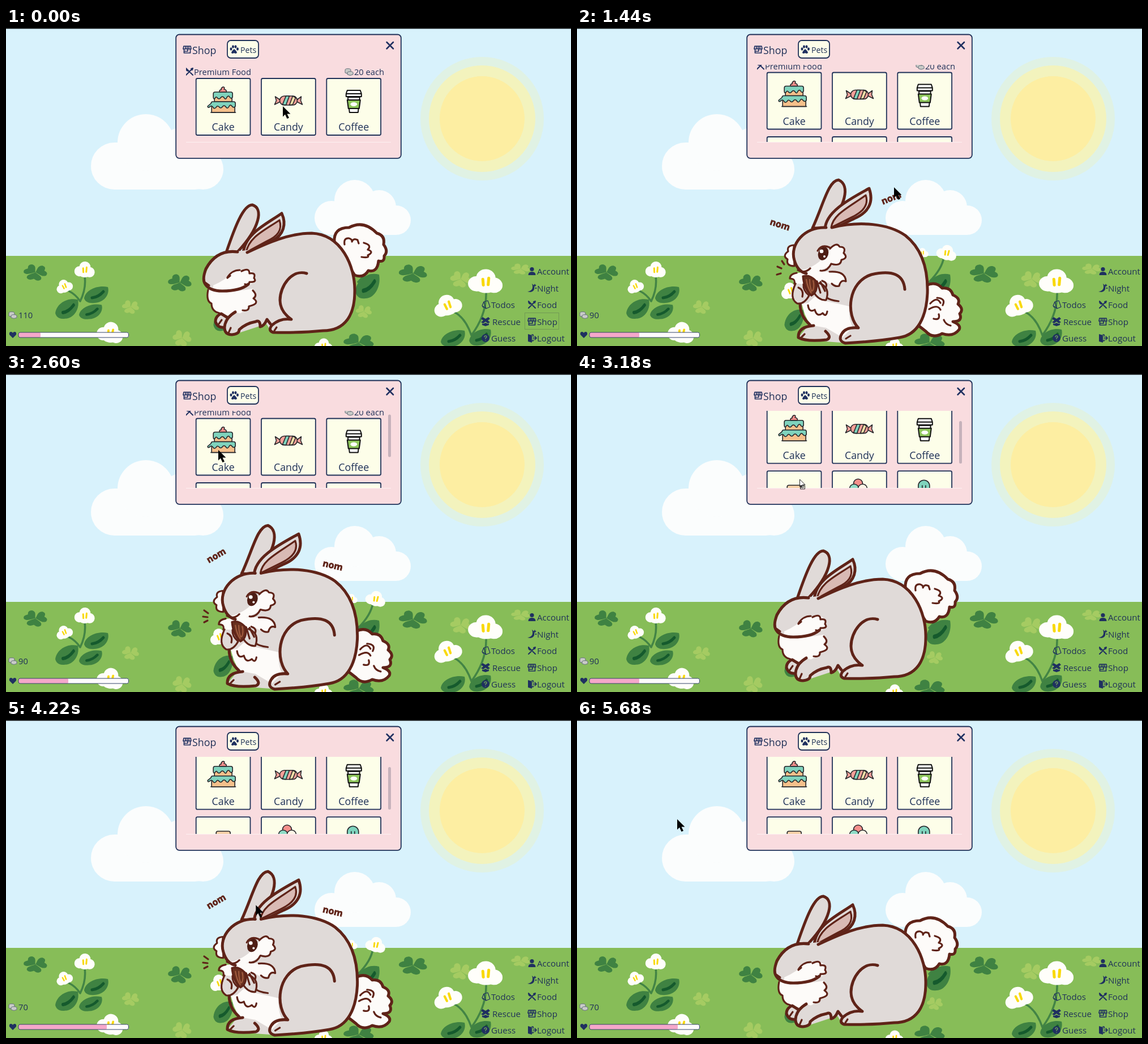
Recreate the animation shown at these times as an HTML page. Size 998 by 561 pixels, loop 5.72 s.

```html
<!DOCTYPE html>
<html lang="en">
<head>
<meta charset="utf-8">
<title>Bunny shop</title>
<style>
html,body{margin:0;height:100%;overflow:hidden;background:#d8f2fc}
svg{display:block;width:100vw;height:100vh}
text{font:14.7px "Open Sans","Noto Sans",sans-serif;fill:#1f3158}
.big{font-size:17.8px}
.mid{text-anchor:middle}
.nom{font:700 16px "Open Sans",sans-serif;fill:#5f2318;stroke:#5f2318;stroke-width:.7;text-anchor:middle}
.ink{stroke:#5f2318;stroke-width:5;stroke-linecap:round;stroke-linejoin:round}
.thin{stroke-width:3.2}
.fur{fill:#e0dad8}.white{fill:#fdfbf9}.pink{fill:#d9bab4}.none{fill:none}
.navy{fill:#1f3060}
.line{fill:none;stroke:#1f3060;stroke-width:1.7;stroke-linecap:round;stroke-linejoin:round}
.card{fill:#fdfee9;stroke:#1f3158;stroke-width:1.8}
.food{stroke:#26262b;stroke-width:1.6;stroke-linejoin:round}
.stem{fill:none;stroke:#438445;stroke-width:3.5;stroke-linecap:round}
</style>
</head>
<body>
<svg viewBox="0 0 998 561" preserveAspectRatio="none">
<defs>
  <path id="petal" d="M0 0C-4-4-12-6-10-13Q-6-18 0-13Q6-18 10-13C12-6 4-4 0 0Z"/>
  <g id="clover">
    <use href="#petal" transform="rotate(-55)"/><use href="#petal" transform="rotate(75)"/><use href="#petal" transform="rotate(190)"/>
  </g>
  <g id="flower">
    <g fill="#fffefa"><circle cx="-9" cy="3" r="9"/><circle cx="9" cy="3" r="9"/><circle cy="-5" r="10"/><ellipse cy="6" rx="11" ry="7"/></g>
    <path d="M-3-3l1 7M3-5l0 8" fill="none" stroke="#f9d90c" stroke-width="3" stroke-linecap="round"/>
  </g>
  <g id="leaf">
    <path fill="#3f8242" d="M-22 6C-20-8 0-18 20-14C24 0 12 14-4 14C-14 15-20 12-22 6Z"/>
    <path d="M-8 5Q3 4 12-6" fill="none" stroke="#155a2d" stroke-width="5" stroke-linecap="round"/>
  </g>
  <g id="user" class="navy"><circle cy="-3.5" r="3.6"/><path d="M-6.500 7Q-6.500 1 0 1T6.500 7Z"/></g>
  <g id="moon" class="navy"><path d="M0-8C8-3 5 10-8 6C0 5 3 0 0-8Z"/><path d="M5-8l1 2 2 1-2 1-1 2-1-2-2-1 2-1Z"/><circle cx="7" cy="0" r="1.200"/></g>
  <path id="note" class="line" style="stroke-width:1.200" d="M-4-5L3-7L7 4L0 7ZM-4-5L-7 2L0 7M-7 2l2 3"/>
  <path id="utensils" class="line" style="stroke-width:2" d="M-6-6L6 6M6-6L-6 6M-6-6q0 5 5 5M6-6l-3 1M6-6l-1 3"/>
  <g id="box" class="navy"><path d="M-5-8L0-5L5-8L8-5L4-2L8 1L4 3L0 0L-4 3L-8 1L-4-2L-8-5Z"/><path d="M-6 3L-4 4L0 2L4 4L6 3V6L0 8L-6 6Z"/></g>
  <path id="store" class="line" d="M-6-6H6L7-1H-7ZM-3-6V-1M0-6V-1M3-6V-1M-5.500-1V6H5.500V-1M-5 3H1V-1"/>
  <g id="help"><circle r="7" class="navy"/><path d="M-2-2q0-2 2-2t2 2q0 1-2 2v1M0 4v0" fill="none" stroke="#6b9a5c" stroke-width="1.500" stroke-linecap="round"/></g>
  <g id="exit"><path class="navy" d="M-7-7L0-5V8L-7 6Z"/><path class="line" d="M0-6H2V-3M0 5H2V3M2 0H7M5-3L8 0L5 3"/></g>
  <g id="coins" fill="#c9cbc8" stroke="#65707a"><ellipse cx="-2" cy="-3" rx="5" ry="2.300"/><path d="M-7-2v4q5 3 10 0v-4"/><ellipse cx="2" cy="2" rx="5" ry="2.300"/><path d="M-3 2v3q5 3 10 0v-3"/></g>
  <g id="paw" class="navy"><ellipse cx="-5.500" cy="-1" rx="2" ry="2.700"/><ellipse cx="-2" cy="-5" rx="2" ry="2.700"/><ellipse cx="2.500" cy="-5" rx="2" ry="2.700"/><ellipse cx="6" cy="-1" rx="2" ry="2.700"/><path d="M0-1Q5 3 5 6Q2 8 0 6Q-3 8-5 6Q-5 3 0-1Z"/></g>
  <path id="heart" class="navy" d="M0 6L-6 0Q-7-5-3-5Q-1-5 0-3Q1-5 3-5Q7-5 6 0Z"/>
  <g id="cake" class="food">
    <path fill="#f5c08b" d="M-15-12H16V2H-15ZM-20 5H21V21H-20Z"/>
    <path fill="#7fd3bd" d="M-17-12q0-3 3-3H14q3 0 3 3V-6q-3 4-5 0q-2-4-5 0q-2 6-5 1q-3-4-6 0q-3 4-6 0q-2-3-4 1q-3 2-3-2ZM-21 5q0-3 3-3H19q3 0 3 3V10q-3 4-6 0q-3-4-5 0q-3 6-6 1q-3-4-6 0q-3 4-6 0q-3-3-5 1q-4 4-6-1q-3-3-5 0q-4 3-4-1Z"/>
    <path fill="#f5908c" d="M-6-15q-1-4 3-4q-1-3 3-5q4 0 2 4q5 1 4 5Z"/><path d="M-22 21H23"/>
  </g>
  <g id="candy" class="food">
    <path fill="#f5a099" d="M-14-1L-23-7L-21 0L-24 7L-14 2ZM15-1L23-7L22 0L25 7L15 2Z"/>
    <rect x="-15" y="-8" width="31" height="16" rx="8" fill="#f5a099"/>
    <path fill="#7fd3bd" d="M-10 7L-4-8H2L-4 8Z"/><path fill="#f7dfa8" d="M2 8L8-8L13-5L8 7Z"/>
  </g>
  <g id="coffee" class="food" style="stroke:#111;stroke-width:2">
    <path fill="#fff" d="M-10-6H11L8 21H-7ZM-11-18H12L14-12H-13ZM-13-12H14V-7H-13Z"/>
    <path fill="#8fc75d" d="M-11-1H12L10 14H-9Z"/><ellipse cx=".5" cy="6.500" rx="6" ry="3.500" fill="#fff" stroke="none"/>
  </g>
  <path id="bread" class="food" fill="#f8cfa5" d="M-12 12V-11Q-12-14-9-14H10Q13-14 13-11V12Z"/>
  <g id="scoops" class="food"><circle cy="-17" cx="-2" r="8" fill="#f5908c"/><circle cx="-9" cy="-8" r="8" fill="#8fdcc6"/><circle cx="6" cy="-8" r="8" fill="#fff5e6"/></g>
  <g id="pop" class="food"><path fill="#7fd3bd" d="M-11 15V-13a10 10 0 0 1 20 0V15Z"/><path d="M-4-14V-5M2-14V-5"/></g>
  <clipPath id="view"><rect x="318" y="65" width="362" height="136"/></clipPath>
</defs>

<rect width="998" height="561" fill="#d8f2fc"/>
<circle cx="841" cy="160" r="109" fill="#e0f2e4"/><circle cx="841" cy="160" r="94" fill="#f3f3bd"/><circle cx="841" cy="160" r="75" fill="#fdeea2"/>
<g fill="#fbfdfd">
  <rect x="150" y="202" width="225" height="83" rx="41.500"/><circle cx="348" cy="249" r="36"/><circle cx="247" cy="202" r="50"/><circle cx="313" cy="220" r="45"/>
  <circle cx="575" cy="335" r="30"/><rect x="560" y="313" width="155" height="52" rx="26"/><circle cx="616" cy="304" r="36"/><circle cx="659" cy="316" r="30"/>
</g>
<rect y="402" width="998" height="159" fill="#87bd58"/>
<path class="stem" d="M131 482Q142 460 139 438M131 482Q123 470 111 464M622 448Q645 425 648 404M822 542Q850 505 848 463M822 542Q812 512 792 501"/>
<g id="meadow"></g>

<g id="sleep">
  <g id="puff">
    <path class="ink white" d="M580 378Q578 352 606 352Q632 338 655 362Q670 366 667 382Q676 394 668 402Q669 414 658 411Q656 432 640 428Q632 442 616 436L596 405Z"/>
    <path class="ink none thin" d="M598 382q-2-12 8-11q6 2 5 6q3-7 10-3l2 6M632 379q15 4 7 12q12 4 0 10q4 5-11 3"/>
  </g>
  <g id="ears">
    <path class="ink fur" d="M389 396C404 352 419 312 435 312C455 318 449 352 409 395Z"/>
    <path class="ink fur" d="M419 398C421 363 460 346 487 327C496 346 490 365 471 375C448 387 435 390 419 398Z"/>
    <path class="ink pink thin" d="M424 396C429 369 455 358 483 339C489 357 479 368 461 376Z"/>
  </g>
  <path class="fur" d="M402 393Q432 396 470 376Q510 362 540 362C592 364 617 420 616 465C616 505 600 534 560 534L470 538L460 522L405 540L376 512L360 465L350 446C355 415 375 396 402 393Z"/>
  <path class="white" d="M358 461Q353 482 363 486Q363 500 376 503Q400 512 420 500Q430 500 428 491Q446 487 438 476Q444 466 435 460Q395 468 358 461ZM366 454Q389 444 400 431L420 428Q438 424 438 440Q444 450 428 453Q400 470 366 461Z"/>
  <path class="ink none" d="M409 395Q372 390 353 425Q346 444 352 452Q360 464 382 464Q414 464 428 452M426 396C462 379 500 362 540 362C592 364 617 420 616 465C616 505 600 534 560 534Q520 538 472 537Q462 534 470 524Q485 511 504 514Q484 500 484 480C484 455 505 425 531 433"/>
  <path class="ink none thin" d="M416 429Q430 422 430 433Q442 431 438 441Q444 449 430 448Q430 454 422 452M391 440Q399 427 413 427M396 437l-5 4M357 462Q353 482 363 486Q363 500 377 503M436 463Q445 472 437 477Q450 486 429 491Q430 500 418 498M352 449l7 5"/>
  <path class="ink fur" d="M380 504Q370 508 370 518Q374 530 387 528L393 512Z"/>
  <path class="ink fur" d="M405 501Q387 512 386 528Q386 541 399 541Q412 540 412 532Q424 521 441 518Q449 514 449 527Q456 526 461 514L467 522"/>
  <path class="ink none thin" d="M397 529l-4 9M381 515l-5 7M478 528l-4 6"/>
</g>

<g id="eat">
  <g id="chew">
    <path class="ink white" d="M617 454Q634 446 645 459Q660 457 664 471Q678 477 673 487Q684 496 676 504Q682 518 664 518Q679 524 675 532Q664 546 645 539Q628 549 616 535L602 524Z"/>
    <path class="ink none thin" d="M624 486q12-13 18-1M622 496q15-9 20 1M636 476q16 1 10 13M630 513q12 3 9-8M648 515q3 8 12 10"/>
    <path class="ink fur" d="M416 353C435 312 444 269 462 268C483 277 475 315 440 353Z"/>
    <path class="ink fur" d="M438 356C438 326 477 304 516 283C525 308 514 326 490 336C475 343 466 349 452 354Z"/>
    <path class="ink pink thin" d="M449 352C452 329 479 317 510 295C517 315 500 327 485 334Z"/>
    <path class="ink white thin" d="M383 383Q370 384 373 394Q362 402 372 408Q369 420 384 420Z"/>
    <path class="fur" d="M440 352Q500 340 545 349C595 362 619 412 619 465C619 510 600 543 560 549L480 556L425 552L392 545L410 523L396 485L381 470L395 432L381 400C380 374 405 352 440 352Z"/>
    <path class="white" d="M398 487Q402 515 418 525L440 529L469 546L487 528Q479 512 481 491Q460 486 440 482L420 474L408 485ZM378 440Q380 432 392 432Q420 428 446 430Q470 428 474 446Q466 440 462 454Q450 456 438 446Q415 456 384 450ZM398 427Q425 420 439 400L452 387Q462 377 467 386Q477 390 472 397Q478 407 468 409Q466 421 449 416Q430 433 402 432Z"/>
    <path class="ink none" d="M440 352C402 350 375 382 384 410Q390 430 405 433M450 352C500 340 550 345 580 366C613 392 620 432 619 468C617 510 602 541 570 546Q530 553 474 556Q460 552 468 539Q475 527 497 529C474 505 479 448 520 435Q576 422 579 461M394 486Q394 508 411 523M418 525Q390 527 391 546Q405 554 441 550Q451 546 439 535"/>
    <path class="ink none thin" d="M447 389Q459 377 464 386Q476 386 471 397Q480 406 467 409Q466 421 449 416Q442 430 430 428M388 432Q376 434 376 442Q386 442 384 451M446 430Q474 428 475 447Q466 443 463 455Q456 457 450 451M433 446Q445 450 438 461Q430 478 462 482M408 489q2 14 12 8q4 14 14 6q6 8 8-3M483 543l-8 5M402 540l-5 5M390 427Q402 434 412 424"/>
    <path class="ink fur thin" d="M386 451Q374 477 389 486Q401 488 410 472Q399 463 400 452M428 450Q448 458 440 480Q427 481 418 466M391 458q10 4 7 16"/>
    <path class="ink thin" fill="#68301f" d="M399 438Q411 434 422 446Q427 465 414 472Q401 461 399 438Z"/>
    <path d="M405 443q2 15 9 25M411 443q0 15 4 22M417 445q3 12-1 19" fill="none" stroke="#a45e41" stroke-width="2"/>
    <path class="ink none thin" d="M424 447l6 20M430 448l8 16"/>
    <ellipse cx="435" cy="398" rx="9" ry="12" transform="rotate(18 435 398)" fill="#4d1d14"/>
    <path class="ink none thin" d="M425 393Q432 381 446 387"/>
    <g fill="#fff"><circle cx="432" cy="394" r="3.300"/><circle cx="437" cy="403" r="2"/></g>
  </g>
  <g class="beat"><text class="nom" transform="translate(357 352) rotate(18)">nom</text><text class="nom" transform="translate(557 305) rotate(-22)">nom</text>
    <path class="ink none thin" d="M362 411l4 6M354 421l7 3M353 435l7-2"/></g>
  <g class="beat"><text class="nom" transform="translate(374 325) rotate(-30)">nom</text><text class="nom" transform="translate(576 343) rotate(13)">nom</text>
    <path class="ink none thin" d="M350 417l7 5M348 428l8 1M350 438l6-3"/></g>
</g>

<rect x="300.200" y="11.500" width="397.600" height="218.300" rx="6" fill="#f9dcdf" stroke="#1f3158" stroke-width="1.800"/>
<use href="#store" x="320" y="38"/><text class="big" x="329" y="46">Shop</text>
<rect class="card" x="391" y="22" width="55" height="31" rx="6"/>
<use href="#paw" x="403" y="38"/><text x="414" y="44" style="font-size:14.200px">Pets</text>
<path class="line" style="stroke-width:2.500" d="M672.500 25L684 36.500M684 25L672.500 36.500"/>
<g clip-path="url(#view)"><g id="list">
  <use href="#utensils" x="324" y="77"/><text x="332" y="83">Premium Food</text>
  <use href="#coins" x="606" y="77"/><text x="668" y="83" text-anchor="end">20 each</text>
</g></g>
<path d="M318 201.500H680" stroke="#fdf0f1"/>
<rect id="thumb" x="675" y="65" width="5" height="75" rx="2.500" fill="#c6b2bb"/>

<g id="menu"></g>
<rect id="focus" x="916.500" y="502.500" width="60" height="29" fill="none" stroke="#52694c" stroke-width=".8" stroke-dasharray="1 1"/>
<use href="#coins" x="12" y="506"/><text id="money" x="22" y="512"></text>
<use href="#heart" x="12" y="541"/>
<rect x="22" y="537" width="195" height="9" rx="3" fill="#fdfbfc"/>
<rect id="love" x="22" y="537" height="9" rx="2" fill="#f5a8ca"/>
<rect x="22" y="537" width="194.500" height="9" rx="3" fill="none" stroke="#34446b"/>
<rect width="998" height="1.300" fill="#000"/>
<g id="cursor">
  <path id="arrow" d="M0 0V18.500L4 14.500L7.500 22L11 20.500L7.500 13.500H13.500Z"/>
  <g id="grab" fill="#fff" stroke="#222"><path d="M0 0V13L3 10L5 15L7 14L5 9.500H9.500Z"/><path d="M1 11h8v6h-8Z" fill="none"/></g>
</g>
</svg>
<script>
const $ = id => document.getElementById(id);
const put = (id, x, y, sx = 1, sy = sx, turn = 0) =>
  `<use href="#${id}" transform="translate(${x} ${y}) rotate(${turn}) scale(${sx} ${sy})"/>`;
const clovers = (fill, list) => `<g fill="${fill}">${list.map(p => put('clover', ...p)).join('')}</g>`;

$('meadow').innerHTML =
  clovers('#3f8242', [[52, 431, 1.25, .9], [307, 449, 1.25, .95], [719, 433, 1.5, 1], [623, 555, 1.6, 1]]) +
  clovers('#a5cb62', [[220, 492, .9, .75], [311, 547, 1, .9], [632, 500, .85, .7], [803, 443, 1.1, .9], [909, 425, 1, .6]]) +
  [[160, 471, 1], [108, 496, .95, 1.2], [150, 501, .95, .9], [639, 456, 1, 1.5], [384, 516, .8, 1.3], [790, 548, 1, 1], [838, 546, .9, 1]]
    .map(p => put('leaf', ...p)).join('') +
  [[139, 427, 1, 1, 5], [103, 456, .82, .82, -20], [184, 538, 1.3, 1.3, 12], [847, 448, 1.7, 1.5, 5], [780, 490, 1.4, 1.3, -18],
   [561, 561, .9, .9, 5], [653, 397, 1, .95, 15], [610, 397, .6], [377, 464, .95, 1, -15]].map(p => put('flower', ...p)).join('');

$('menu').innerHTML = [
  ['user', 929, 'Account', 435], ['moon', 929, 'Night', 465], ['note', 848, 'Todos', 494], ['utensils', 929, 'Food', 494],
  ['box', 847, 'Rescue', 524, 859], ['store', 929, 'Shop', 524], ['help', 847, 'Guess', 553], ['exit', 929, 'Logout', 553]
].map(([icon, x, label, y, tx = x < 900 ? 857 : 938]) =>
  put(icon, x, y - 6) + `<text x="${tx}" y="${y}" style="font-size:15.100px">${label}</text>`).join('');

$('list').innerHTML += [['cake', 'Cake'], ['candy', 'Candy'], ['coffee', 'Coffee'], ['bread', ''], ['scoops', ''], ['pop', '']]
  .map(([icon, label], i) => {
    const x = 335.7 + i % 3 * 115.3, y = 89 + (i > 2 ? 113.5 : 0);
    return `<rect class="card" x="${x}" y="${y}" width="95.800" height="100" rx="2.500"/>` +
      put(icon, x + 47.5, y + 39) + `<text class="big mid" x="${x + 47.9}" y="${y + 92}">${label}</text>`;
  }).join('');

const LOOP = 5720, FEED = [960, 3620], MEAL = 1900;
// time, x, y
const path = [[0, 489, 138], [280, 489, 138], [700, 480, 455], [960, 480, 455], [1440, 560, 281], [1700, 565, 275],
  [2500, 375, 134], [3000, 375, 134], [3560, 450, 345], [3760, 447, 333], [4400, 440, 325], [4880, 385, 295], [5660, 177, 175], [LOOP, 177, 175]];
const between = (t, a, b) => t >= a && t < b;
const ease = (t, a, b) => { const k = Math.min(1, Math.max(0, (t - a) / (b - a))); return k * k * (3 - 2 * k); };
const show = (el, on) => el.style.display = on ? '' : 'none';
const beats = document.querySelectorAll('.beat');

function draw(t) {
  const fed = FEED.filter(s => t >= s).length;
  const since = fed ? t - FEED[fed - 1] : Infinity;
  const eating = since < MEAL, beat = Math.floor(since / 500) % 2;
  show($('eat'), eating);
  show($('sleep'), !eating);
  if (eating) {
    beats.forEach((el, i) => show(el, i === beat));
    $('chew').setAttribute('transform', beat ? 'translate(390 556) scale(1.007 1.003) translate(-390 -556)' : '');
  }
  const breath = Math.floor(t / 365) % 2;
  $('puff').setAttribute('transform', `translate(0 ${breath * 2})`);
  $('ears').setAttribute('transform', `translate(0 ${-breath})`);

  $('money').textContent = 110 - 20 * fed;
  $('love').setAttribute('width', [39, 88, 156][fed]);

  const scroll = 10.5 * ease(t, 40, 240) + 20.8 * ease(t, 2720, 2920);
  $('list').setAttribute('transform', `translate(0 ${-scroll})`);
  $('thumb').setAttribute('y', 65.5 + scroll * .56);
  show($('thumb'), between(t, 40, 1200) || between(t, 2420, 4300));
  show($('focus'), t < 280);

  const i = path.findIndex(p => p[0] > t), [t0, x0, y0] = path[i - 1], [t1, x1, y1] = path[i];
  const k = ease(t, t0, t1);
  $('cursor').setAttribute('transform', `translate(${x0 + (x1 - x0) * k} ${y0 + (y1 - y0) * k})`);
  const drag = between(t, 330, FEED[0]) || between(t, 3040, FEED[1]);
  show($('arrow'), !drag);
  show($('grab'), drag);
}

const start = performance.now();
(function tick() {
  draw((performance.now() - start) % LOOP);
  requestAnimationFrame(tick);
})();
</script>
</body>
</html>
```
